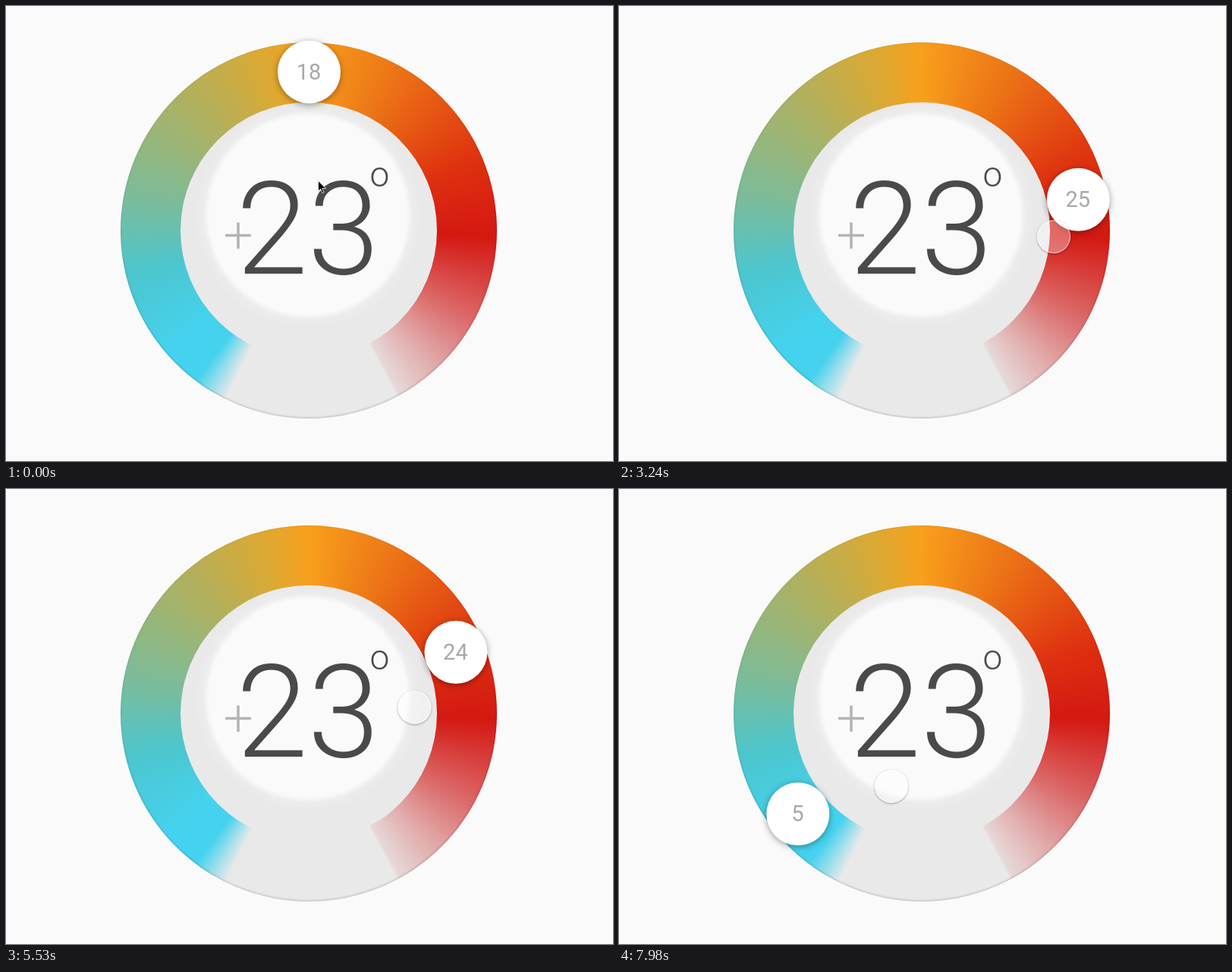
Animation, 800 px wide and 600 px high, one loop 8 s. Source, as an HTML page:

```html
<!DOCTYPE html>
<html lang="en">
<head>
<meta charset="utf-8">
<title>Thermostat dial</title>
<style>
  html, body { margin: 0; width: 100%; height: 100%; overflow: hidden; background: #fafafa; }
  div, svg { position: absolute; }
  div { border-radius: 50%; box-sizing: border-box; }
  #ring {
    left: 151px; top: 48px; width: 496px; height: 496px;
    background: conic-gradient(#f89f1c, #ec7216 30deg, #de3010 68deg, #d41812 92deg,
      #db6666 118deg, #e2aeae 138deg, #e6d8d8 151deg, #e9e9e9 152deg 206deg,
      #45d2ee 217deg 230deg, #4cc6ce 256deg, #7abc9c 280deg, #b0b05e 318deg,
      #dca933 345deg, #f89f1c);
    box-shadow: inset 0 -1px 3px rgba(0,0,0,.2);
  }
  #face {
    left: 230px; top: 127px; width: 338px; height: 338px;
    background: radial-gradient(circle at 168px 149px, #fafafa 130px, #ececec 138px, #e9e9e9 150px);
  }
  #knob {
    left: -41.5px; top: -41.5px; width: 83px; height: 83px; background: #fff;
    box-shadow: 0 2px 8px rgba(0,0,0,.38);
    font: 29px/83px Roboto, sans-serif; color: #a8a8a8; text-align: center;
  }
  #touch {
    left: -22px; top: -22px; width: 44px; height: 44px;
    background: rgba(255,255,255,.35); border: 1px solid rgba(255,255,255,.65);
    box-shadow: 0 1px 3px rgba(0,0,0,.35);
  }
  svg { left: 0; top: 0; }
  text { font-family: Roboto, sans-serif; font-weight: 300; fill: #4a4a4a; }
</style>
</head>
<body>
<div id="ring"></div>
<div id="face"></div>
<svg width="800" height="600">
  <path d="M289 302.5H323M306 285.5V320" stroke="#b3b3b3" stroke-width="3.5"/>
  <text x="303.5" y="352.5" font-size="170">23</text>
  <text x="492.5" y="237.5" font-size="46" text-anchor="middle">o</text>
</svg>
<div id="knob"></div>
<div id="touch"></div>
<svg id="arrow" width="14" height="20">
  <path d="M.5 .5V14L3.7 11.2L5.9 16.5L8 15.6L5.8 10.5H10.3Z" fill="#000" stroke="#fff" stroke-width=".8"/>
</svg>
<script>
  const LOOP = 8000, PRESS = 1390, DRAG = 1800;
  const CENTER = [399, 296.5], ORBIT = 210;
  const PIVOT = [433, 332.5]; // the touch mark trails the finger, so it circles this point
  const [knob, touch, arrow] = ['knob', 'touch', 'arrow'].map(id => document.getElementById(id));

  // Pointer path: time, x, y; repeated places are rests
  const path = [
    [540, 411, 230], [910, 399, 79], [1760, 399, 79],
    [2110, 486.5, 119], [2530, 546, 244], [2840, 546, 244],
    [3240, 573, 304], [3930, 553, 393], [4280, 545, 407], [4650, 545, 407],
    [5530, 538.5, 288], [6400, 374, 232], [7110, 345, 310], [7980, 359, 392]
  ];
  const last = path.length - 2;

  const secant = (i, c) => (path[i + 1][c] - path[i][c]) / (path[i + 1][0] - path[i][0]);

  function slope(i, c) {
    const a = secant(Math.max(i - 1, 0), c), b = secant(Math.min(i, last), c);
    return a * b > 0 ? 2 * a * b / (a + b) : 0;
  }

  // Monotone cubic through the path
  function at(t, c) {
    let i = 0;
    while (i < last && t >= path[i + 1][0]) i++;
    const p = path[i], q = path[i + 1], h = q[0] - p[0];
    const u = Math.min(1, Math.max(0, (t - p[0]) / h)), v = 1 - u;
    return v * v * (1 + 2 * u) * p[c] + u * u * (1 + 2 * v) * q[c]
      + h * u * v * (v * slope(i, c) - u * slope(i + 1, c));
  }

  const move = (el, x, y, scale = 1) =>
    el.style.transform = `translate(${x}px, ${y}px) scale(${scale})`;

  function draw(now) {
    const t = now % LOOP, x = at(t, 1), y = at(t, 2);
    const angle = t < DRAG ? 0 : Math.atan2(x - PIVOT[0], PIVOT[1] - y);
    const press = Math.min(1, Math.max(0, (t - PRESS + 40) / 160));

    move(knob, CENTER[0] + ORBIT * Math.sin(angle), CENTER[1] - ORBIT * Math.cos(angle));
    knob.textContent = Math.floor(18.01 + angle * 18 / Math.PI); // one step per 10 degrees
    move(touch, x, y, 1.25 - .25 * press);
    touch.style.opacity = t < PRESS ? 0 : press;
    move(arrow, x, y);
    arrow.style.opacity = t < PRESS ? 1 : 0;
    requestAnimationFrame(draw);
  }
  requestAnimationFrame(draw);
</script>
</body>
</html>
```
